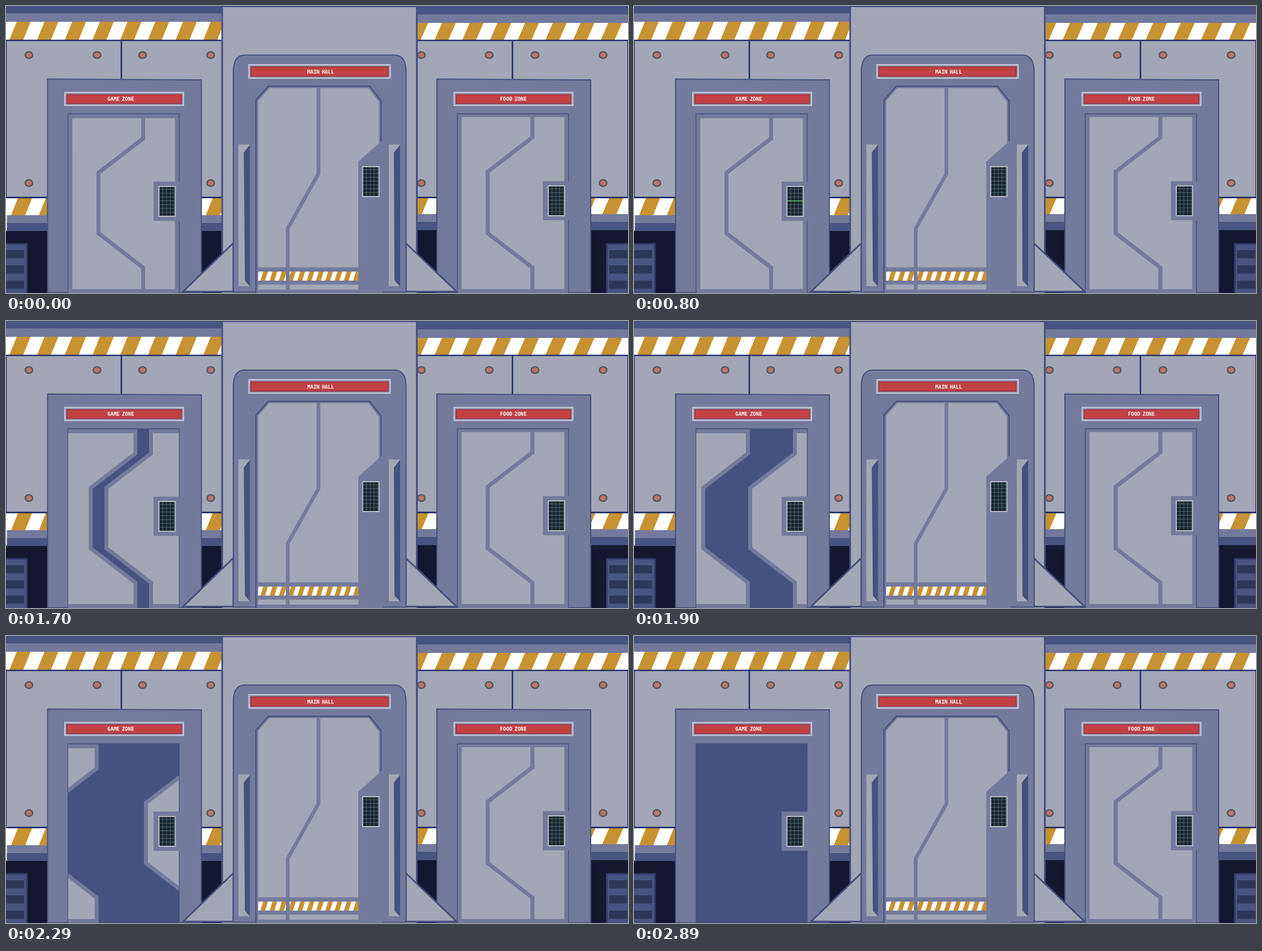
Write an HTML page that moves like this. It is 1100 by 509 pixels and loops after 2.99 s.

```html
<!DOCTYPE html>
<html lang="en">
<head>
<meta charset="utf-8">
<title>Station doors</title>
<style>
  html, body { margin: 0; width: 100%; height: 100%; overflow: hidden; background: #14172f; }
  svg { display: block; width: 100vw; height: 100vh; }
  text {
    font: bold 9px "DejaVu Sans Mono", "Liberation Mono", monospace;
    fill: #fff; text-anchor: middle; word-spacing: -1.5px;
  }
</style>
</head>
<body>
<svg id="stage" viewBox="0 0 1100 509" preserveAspectRatio="none"></svg>
<script>
const GREY = '#a3a6b5', MAUVE = '#747a9c', BLUE = '#46517f', NAVY = '#21306d',
      NIGHT = '#14172f', GOLD = '#c79232', SLAT = '#2f3759';

const rect = (x, y, x2, y2, fill, extra = '') =>
  `<rect x="${x}" y="${y}" width="${x2 - x}" height="${y2 - y}" fill="${fill}" ${extra}/>`;
const path = (d, fill, stroke = 'none', width = 0) =>
  `<path d="${d}" fill="${fill}" stroke="${stroke}" stroke-width="${width}"/>`;

// Slanted gold bars on white; x is the top left corner of the first bar.
let clips = 0;
function hazard(x1, y1, x2, y2, x, step, bar, skew) {
  const id = 'band' + clips++;
  let d = '';
  for (; x < x2 + skew; x += step)
    d += `M${x} ${y1}h${bar}L${x + bar - skew} ${y2}h${-bar}z`;
  return `<clipPath id="${id}">${rect(x1, y1, x2, y2, '#000')}</clipPath>` +
    rect(x1, y1, x2, y2, '#fff') +
    `<g clip-path="url(#${id})">${path(d, GOLD)}</g>`;
}

const rivet = (x, y) =>
  `<ellipse cx="${x}" cy="${y}" rx="6.6" ry="5.8" fill="#b8756b" stroke="#565a5e" stroke-width="2.6"/>`;

function wall(x1, x2, seam, top, low, phase, lowPhase) {
  return rect(x1, 0, x2, top, '#4a5482') +
    rect(x1, top - 1, x2, top + 14, MAUVE) +
    hazard(x1, top + 14, x2, 60, phase, 49, 24.5, 13) +
    rect(x1, 61, x2, 339.5, GREY, `stroke="${NAVY}" stroke-width="2.4"`) +
    path(`M${seam} 61V339`, 'none', NAVY, 2.6) +
    hazard(x1, 341, x2, low, lowPhase, 49.2, 25, 12) +
    rect(x1, low, x2, low + 14, MAUVE) +
    rect(x1, low + 14, x2, low + 28, '#4a5482');
}

function vent(x1, x2, s1, s2) {
  let out = rect(x1, 422, x2, 515, '#4a5482', 'stroke="#323b68" stroke-width="3"');
  for (const y of [433, 460, 487]) out += rect(s1, y, s2, y + 14.5, SLAT);
  return out;
}

function sign(x1, y1, x2, y2, label, tx) {
  return rect(x1 + 1, y1 + 1, x2 - 1, y2 - 1, '#9195a8', 'stroke="#c5cad8" stroke-width="2"') +
    rect(x1 + 4.7, y1 + 5, x2 - 4.7, y2 - 4.5, '#c24244', 'stroke="#9c2e45" stroke-width="1.6"') +
    `<text x="${tx}" y="${(y1 + y2) / 2 + 3.6}">${label}</text>`;
}

function keypad(x, y) {
  let d = '';
  for (let i = 1; i < 5; i++) d += `M${x + 1 + i * 6.7} ${y + 1.5}v52`;
  for (let i = 1; i < 8; i++) d += `M${x + 1.5} ${y - 0.5 + i * 6.75}h28`;
  return rect(x + 1, y + 1, x + 30, y + 54, '#1a2233') +
    path(d, 'none', '#587e70', 0.8) +
    rect(x + 1, y + 1, x + 30, y + 54, 'none', 'stroke="#b9bcc0" stroke-width="2"');
}

// Both leaves of a side door share the same zigzag edge.
function leaf(side, lift) {
  const edge = `V${235 - lift}L163.5 ${296 - lift}V403L242.5 464V505.5`;
  const x = side === 'left' ? 113.7 : 302.3;
  return path(`M${x} ${195.5 - lift}H242.5${edge}H${x}z`, GREY, MAUVE, 7);
}

function sideDoor(id, dx, lift, label, tx) {
  return `<g transform="translate(${dx} 0)">` +
    path('M73.5 129.5L345.5 131V508.5H73.5z', MAUVE, BLUE, 2) +
    rect(109, 190.5, 307, 509, BLUE) +
    `<g clip-path="url(#opening)">
       <g id="${id}L">${leaf('left', lift)}</g>
       <g id="${id}R">${leaf('right', lift)}</g>
     </g>` +
    rect(261, 311.5 - lift / 2, 307.5, 381 - lift / 2, MAUVE) +
    keypad(269.5, 319 - lift / 2) +
    '</g>' + sign(103 + dx, 152.3, 316 + dx - 1, 177.3, label, tx);
}

function mainHall() {
  return rect(382.3, 0.5, 726.5, 515, GREY, `stroke="${BLUE}" stroke-width="3"`) +
    path('M402 420.5L313 506.5H402zM707 420.5L797 506.5H707z', GREY, BLUE, 3) +
    path('M402 507.5V117Q402 87 422 87H687Q707.5 87 707.5 117V507.5z', MAUVE, BLUE, 2) +
    rect(443, 506, 666, 509, MAUVE) +
    path('M446 503V168L466 145.5H641L659.5 169.5V243.5L623 276V503z', GREY) +
    path('M442 509V167L464 142.3H643L663.3 168V240', 'none', BLUE, 2.2) +
    rect(446, 463.5, 623, 494, MAUVE) +
    hazard(446, 471, 623, 487, 438.5, 16.4, 8.4, 5) +
    path('M552.5 145V297.5L498.2 394.5V509', 'none', MAUVE, 6.6) +
    rect(411, 245.5, 431, 497, GREY) + rect(677, 245.5, 697, 497, GREY) +
    path('M420.5 260L431.5 246V497.5L422.5 487zM686 260L697 246V497.5L687 487z', BLUE) +
    keypad(629.7, 284) +
    sign(428.5, 103, 680.5, 129, 'MAIN HALL', 556.5);
}

const rivets = [[40.5, 87], [161, 87], [241.5, 87], [362, 87], [40.5, 314], [362, 314],
  [734.5, 87], [854.5, 87], [935.5, 87], [1056, 87], [734.5, 314], [1056, 314]];

document.getElementById('stage').innerHTML =
  `<clipPath id="opening">${rect(110, 192, 305.7, 509, '#000')}</clipPath>` +
  rect(0, 0, 1100, 509, NIGHT) +
  wall(0, 382, 204, 14, 371, 19, 21) +
  rect(0, 371, 1.5, 398, '#fff') +
  wall(727, 1100, 895.7, 16, 369.5, 722, 722) +
  rivets.map(p => rivet(...p)).join('') +
  vent(-5, 37, 0, 32) + vent(1062.5, 1105, 1067, 1099) +
  sideDoor('game', 0, 0, 'GAME ZONE', 203) +
  sideDoor('food', 688.5, 2, 'FOOD ZONE', 897.3) +
  mainHall() +
  rect(271.3, 0, 299.3, 1.6, '#6cc76c', 'id="scan"');

const LOOP = 2990;
const starts = [...Array.from({ length: 19 }, (_, i) => i * 100),
  1900, 2020, 2170, 2290, 2440, 2590, 2740, 2890];
const scan = document.getElementById('scan');
const leftLeaf = document.getElementById('gameL');
const rightLeaf = document.getElementById('gameR');
const show = (el, on) => el.setAttribute('visibility', on ? 'visible' : 'hidden');

function draw(now) {
  const t = now % LOOP;
  const step = starts.filter(s => s <= t).length - 1;

  // The beam sweeps the keypad, then the leaves part.
  show(scan, step > 0 && step < 16);
  scan.setAttribute('y', 317.7 + 3.385 * step);

  const open = Math.max(0, step - 16);
  leftLeaf.setAttribute('transform', `translate(${-13.7 * open} 0)`);
  rightLeaf.setAttribute('transform', `translate(${14 * open} 0)`);
  show(leftLeaf, open < 10);
  show(rightLeaf, open < 10);
}

let begin;
function tick(now) {
  begin ??= now;
  draw(now - begin);
  requestAnimationFrame(tick);
}
draw(0);
requestAnimationFrame(tick);
</script>
</body>
</html>
```
